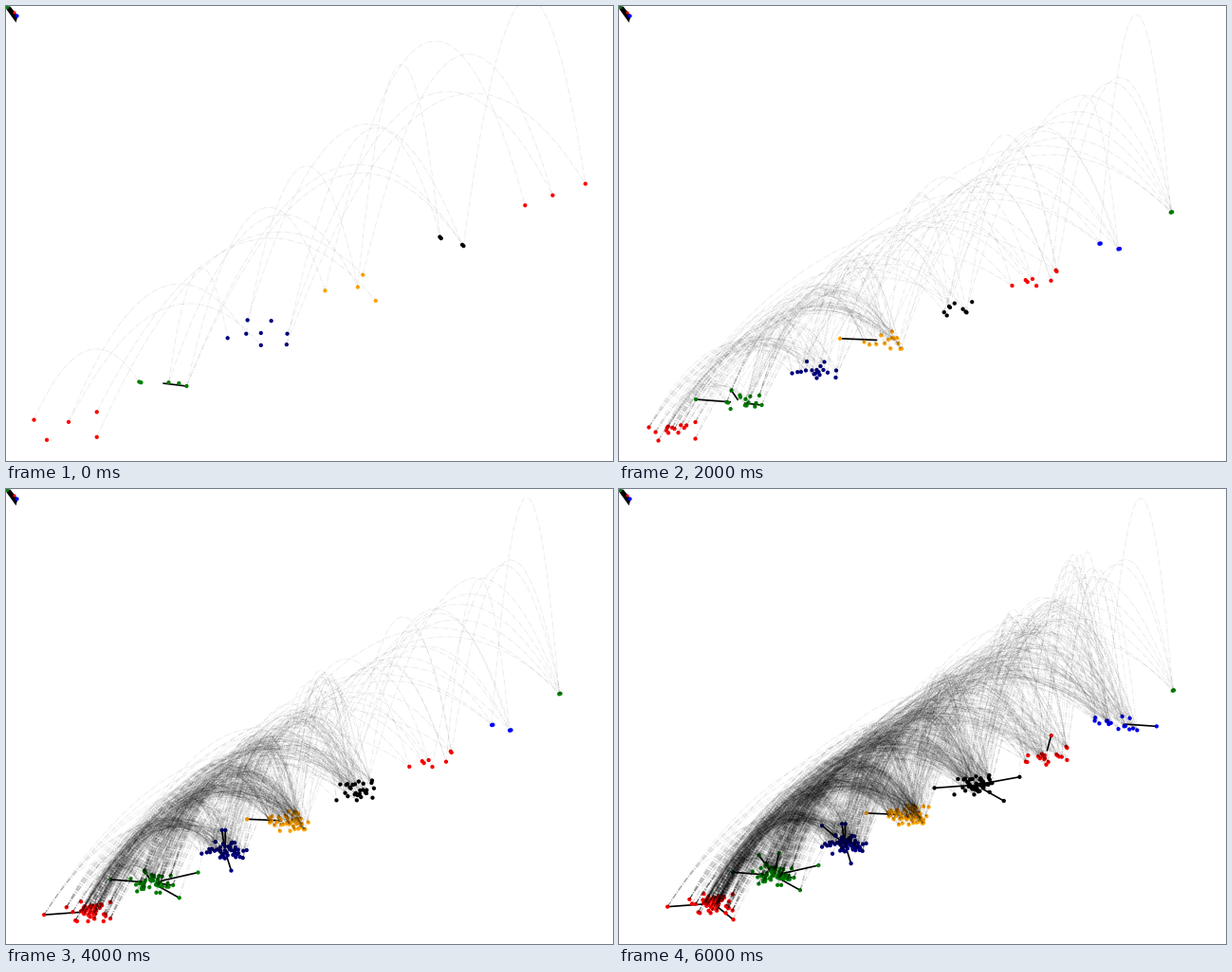
These frames come from a looping animation (640 px wide and 480 px high, 7000 ms). A matplotlib script:

```python
import numpy as np
import matplotlib.pyplot as plt
from matplotlib.animation import FuncAnimation
from matplotlib.collections import LineCollection, PolyCollection

W, H, DPI = 640, 480, 100
T = np.linspace(0, 1, 32)
rng = np.random.default_rng(11)

# View of each step: x' = ax * x + bx, y' = ay * y + by
VIEWS = [
    (1.352, -12.9, 1.5137, -236),
    (1, 0, 1, 0),
    (1, 0, 1, 0),
    (0.998, 1, 1, 0),
    (0.944, 34, 0.9924, 0.15),
    (0.944, 34, 0.9711, 1.25),
    (0.9258, 45.1, 0.9711, 1.25),
]

# Each group grows around its first dots
GROUPS = [
    ("red", [(31, 444), (41, 458), (58, 445.5), (80, 438.5), (80, 456)]),
    ("green", [(113, 417.5), (114.5, 418), (136, 418), (144, 418.5)]),
    ("navy", [(182, 387), (196.5, 384), (197.5, 374.5), (208, 383.5),
              (208, 392), (216, 375), (228.5, 384), (228, 391.5)]),
    ("orange", [(258, 354), (287.5, 343), (283.5, 351.5), (297.5, 361)]),
    ("black", [(347.5, 316.5), (348.5, 317.5), (365, 322), (366, 322.8)]),
    ("red", [(414, 294.5), (435.5, 287.5), (461, 279.5)]),
    ("blue", [(506, 250.3), (507.3, 250), (526, 256), (527.5, 255.6)]),
    ("green", [(581.3, 217.3), (582.7, 216.8)]),
]
CENTERS = [np.mean(pts, axis=0) for _, pts in GROUPS]

# Per step: new dots per group, last group to get them,
# rounds of links, last group linked, widest gap between linked groups
GROWTH = [
    (0, 0, 1, 5, 3),
    (5, 5, 1, 7, 5),
    (5, 3, 10, 3, 5),
    (10, 3, 22, 3, 5),
    (18, 4, 16, 4, 5),
    (7, 4, 5, 4, 5),
    (11, 6, 14, 6, 5),
]

# Outlying dots tied to their group by a spoke: group, x, y
OUTLIERS = {
    0: [(1, 150, 420.5)],
    2: [(1, 80.5, 414.5), (1, 118, 405), (3, 232.5, 350.3)],
    3: [(1, 157, 434), (2, 204.5, 362), (2, 208.5, 362)],
    4: [(0, 6, 452), (1, 178, 407), (2, 215, 405)],
    5: [(1, 110, 396), (4, 389, 337)],
    6: [(0, 81, 466), (1, 133, 394), (2, 182, 364), (4, 310, 323),
        (4, 407, 311), (5, 443, 266), (6, 563, 256)],
}


def view(points, step):
    ax_, bx, ay, by = VIEWS[step]
    return np.asarray(points) * (ax_, ay) + (bx, by)


def arc(p, q, a, b):
    """Parabola from group a to group b: later groups lift it, long gaps flatten it."""
    lift = (36 * b - 0.8 * b * b) * (b - a) ** -0.25 * rng.uniform(0.9, 1.08)
    x = p[0] + (q[0] - p[0]) * T
    y = p[1] + (q[1] - p[1]) * T - 4 * lift * T * (1 - T)
    return np.column_stack([x, y])


def linked_pairs(last, span):
    """Neighbouring groups link once a round, distant ones twice."""
    return [(a, b) for b in range(last + 1) for a in range(max(0, b - span), b)
            for _ in range(1 if b - a == 1 else 2)]


def grow():
    """Lists of (step, colour, point), (step, spoke) and (step, curve)."""
    dots, spokes, arcs = [], [], []
    members = [list(pts) for _, pts in GROUPS]
    outer = [[] for _ in GROUPS]
    for g, (color, pts) in enumerate(GROUPS):
        dots += [(int(g > 5), color, p) for p in pts]
    for step, (count, last_grown, rounds, last_linked, span) in enumerate(GROWTH):
        for g in range(last_grown + 1):
            offs = np.clip(rng.normal(0, 1, (count, 2)), -2.1, 2.1) * (11.5, 5)
            new = list(CENTERS[g] + offs)
            members[g] += new
            dots += [(step, GROUPS[g][0], p) for p in new]
        for g, *p in OUTLIERS.get(step, []):
            outer[g].append(p)
            dots.append((step, GROUPS[g][0], p))
            inner = CENTERS[g] + 0.2 * (p - CENTERS[g])
            spokes.append((step, [p, inner]))
        for a, b in linked_pairs(last_linked, span) * rounds:
            p = rng.choice(members[a] + outer[a])
            q = rng.choice(members[b])
            arcs.append((step, arc(p, q, a, b)))
    return dots, spokes, arcs


dots, spokes, arcs = grow()

fig = plt.figure(figsize=(W / DPI, H / DPI), dpi=DPI, facecolor="white")
ax = fig.add_axes([0, 0, 1, 1])
ax.set_xlim(-0.5, W - 0.5)
ax.set_ylim(H - 0.5, -0.5)
ax.axis("off")

spoke_lines = LineCollection([], colors="black", linewidths=1.2, zorder=1)
arc_lines = LineCollection([], colors="black", linewidths=0.7, alpha=0.08,
                           linestyles="dashdot", zorder=3)
ax.add_collection(spoke_lines, autolim=False)
ax.add_collection(arc_lines, autolim=False)
marks = ax.scatter([], [], s=[9.5], linewidths=0, zorder=2)

# Small heap in the corner
heap = [(0, 0), (4, 0), (12, 10), (10, 17), (0, 3)]
ax.add_collection(PolyCollection([heap], facecolors="black", zorder=4),
                  autolim=False)
ax.scatter([1, 8.5, 11], [1, 6.5, 10], s=[6, 5, 9],
           c=["green", "red", "blue"], linewidths=0, zorder=5)


def draw(step):
    live = [(color, p) for born, color, p in dots if born <= step]
    marks.set_offsets(view([p for _, p in live], step))
    marks.set_facecolors([color for color, _ in live])
    spoke_lines.set_segments([view(s, step) for born, s in spokes if born <= step])
    arc_lines.set_segments([view(c, step) for born, c in arcs if born <= step])
    return spoke_lines, marks, arc_lines


anim = FuncAnimation(fig, draw, frames=len(VIEWS), interval=1000, repeat=True,
                     repeat_delay=0)
plt.show()
```
